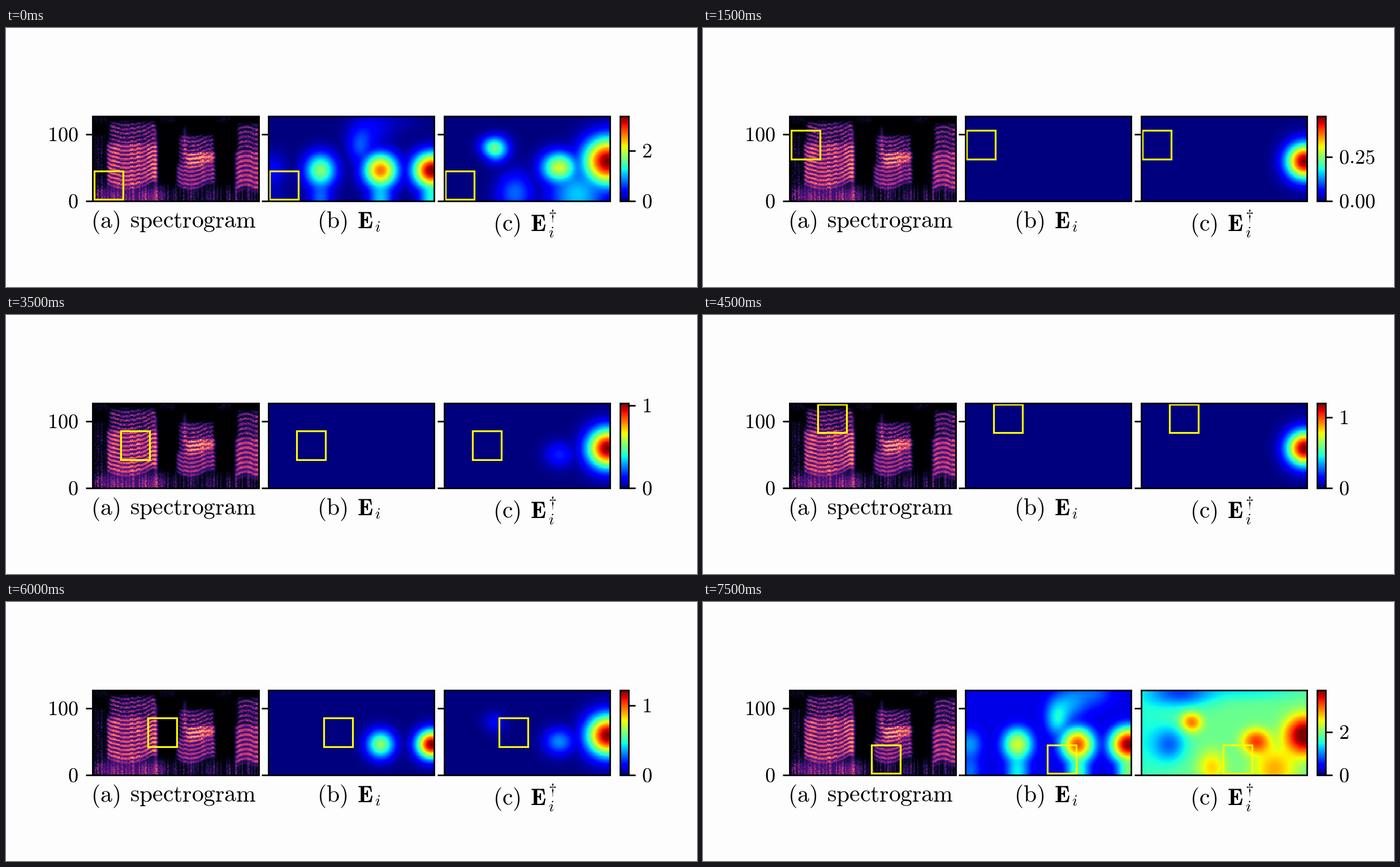
Animation of 1222x458 px, one loop 8 s. Source, as a matplotlib script:

```python
import numpy as np
import matplotlib.pyplot as plt
from matplotlib.animation import FuncAnimation
from matplotlib.patches import Rectangle

plt.rcParams.update({"mathtext.fontset": "cm", "text.hinting": "none"})

W, H, DPI = 1222, 458, 100
PT = 72 / DPI                       # points per pixel
LINE = 2.8 * PT
TOP, BOTTOM = 156.4, 306.0
PANEL_W = 293.3
LEFTS = (153.2, 463.9, 774.7)
BAR = (1086.2, 1100.5)
HUNDRED = 188.4

# Largest energy of each step; the square climbs five rows, then moves right
PEAKS = (3.36, 1.7, 0.47, 0.479, 0.4, 0.105, 0.42, 1.024, 0.75, 1.2,
         3.52, 1.9, 1.215, 0.85, 0.7, 3.93)
E_START = (0.10, 0.78, 0.0, -0.1)   # threshold of (b) at the foot of a column

# Panel grid, x from the panel's left edge, y in stage pixels
COLS, ROWS = 147, 128
X, Y = np.meshgrid((np.arange(COLS) + 0.5) * PANEL_W / COLS,
                   TOP + (np.arange(ROWS) + 0.5) * (BOTTOM - TOP) / ROWS)


def sig(z):
    return 1 / (1 + np.exp(-np.clip(z, -50, 50)))


def bell(cx, cy, rx, ry, scale=1):
    return np.exp(-0.5 * (((X - cx) / rx) ** 2 + ((Y - cy) / ry) ** 2)
                  / scale ** 2)


def lit(amp, theta):
    return max(amp - theta, 0) / max(1 - theta, 0.05)


def blend(spots, theta, base=0):
    """Soft maximum of the spots that rise above the threshold."""
    scale = max(1 - theta, 0.05) ** 0.25
    powers = lit(base, theta) ** 3 + sum(
        (lit(amp, theta) * bell(*place, scale)) ** 3 for *place, amp in spots)
    return np.cbrt(powers)


E_SPOTS = []
for x, amp in ((8, 0.2), (92, 0.56), (198, 0.81), (288, 1)):
    E_SPOTS.append((x, 252, 16 + 7 * amp, 22, amp))
    E_SPOTS.append((x, 300, 16, 30, 0.45 * amp ** 0.7))
for t in np.linspace(0, 1, 4):      # plume drifting up and to the right
    E_SPOTS.append((162 + 60 * t * t, 208 - 48 * t, 16 + 16 * t, 24,
                    0.28 - 0.14 * t))

D_SPOTS = [(88, 213, 19, 18, 0.70), (203, 247, 25, 22, 0.75),
           (288, 236, 33, 33, 1), (235, 295, 40, 40, 0.58),
           (125, 292, 26, 30, 0.52)]
D_HOLES = [(50, 252, 20, 21, 1), (68, 160, 42, 18, 1.2),
           (190, 156, 60, 12, 0.5), (0, 240, 40, 60, 0.4)]


def e_map(col, row):
    return np.clip(blend(E_SPOTS, E_START[col] + 0.3 * row), 0, 1)


def d_map(col, row):
    start = 0.38 - 0.19 * col
    theta = 0.85 - (0.85 - start) * 0.47 ** row
    v = blend(D_SPOTS, theta, 0.38)
    depth = min(0.75 + 1.3 * theta, 1)
    for *place, amp in D_HOLES:
        v = v * (1 - min(depth * amp, 1) * bell(*place))
    return np.clip(v, 0, 1)


def spectrogram():
    rng = np.random.default_rng(4)
    S = X + LEFTS[0]
    grain = rng.random((ROWS, COLS))
    column = rng.random(COLS)[None, :]
    block = np.repeat(rng.random(COLS // 3), 3)[None, :]

    def window(x0, x1, y0, y1):
        return (sig((S - x0) / 1.3) * sig((x1 - S) / 1.3)
                * sig((Y - y0) / 2) * sig((y1 - Y) / 2.5))

    def voice(x0, x1, top, split, foot, bend, gap, gain):
        wave = np.cos(2 * np.pi * (Y + bend + 2 * block) / gap)
        h = (0.5 + 0.5 * wave) * (0.75 + 0.4 * block)
        loud = window(x0, x1, split, foot - bend) * (0.22 + 0.5 * h)
        faint = window(x0 + 4, x1 - 3, top, split) * (0.1 + 0.42 * h)
        return gain * loud + faint * (0.5 + 0.6 * grain)

    def cup(x, width, depth):
        return np.minimum(depth * ((S - x) / width) ** 2, 1.3 * depth)

    v = voice(180, 267, 168, 205, 283, cup(214, 40, 10), 7.5, 1)
    v += voice(303, 369, 192, 243, 284, cup(326, 26, 8), 7.5, 0.75)
    v += voice(320, 369, 222, 222, 244, cup(326, 40, 8), 7.5, 1)
    v += voice(406, 450, 172, 219, 284, 3 * np.cos((S - 424) / 7), 8.5, 0.9)
    v += 0.2 * window(314, 318, 176, 245) + 0.3 * window(263, 266, 180, 304)

    # breath and low noise
    low = sig((Y - 284) / 5)
    v += low * (0.04 + 0.3 * column ** 2) * (0.5 + 0.7 * grain)
    v += 0.2 * low * window(170, 268, 150, 320)
    v += 0.18 * window(156, 181, 190, 302) * grain * column
    for x in (155, 272, 372):
        v += 0.14 * window(x, x + 27, 158, 166) * grain
    return np.clip(v * (0.86 + 0.28 * grain), 0, 0.84)


fig = plt.figure(figsize=(W / DPI, H / DPI), dpi=DPI, facecolor="#fdfdfd")
ax = fig.add_axes((0, 0, 1, 1))
ax.axis("off")


def image(data, x0, x1, cmap):
    return ax.imshow(data, extent=(x0, x1, BOTTOM, TOP), cmap=cmap, vmin=0,
                     vmax=1, interpolation="nearest", aspect="auto", zorder=1)


def box(x, y, w, h, color="black", lw=LINE, z=4):
    return ax.add_patch(Rectangle((x, y), w, h, fill=False, ec=color, lw=lw,
                                  joinstyle="miter", zorder=z))


def tick(x, y):
    return ax.plot([x, x + 12.2], [y, y], color="black", lw=LINE,
                   solid_capstyle="butt", zorder=4)[0]


def label(x, y, text, px=41.67, ha="left"):
    return ax.text(x, y, f"${text}$", fontsize=px * PT, ha=ha, va="baseline")


image(spectrogram(), LEFTS[0], LEFTS[0] + PANEL_W, "magma")
maps = [image(np.zeros((ROWS, COLS)), x, x + PANEL_W, "jet")
        for x in LEFTS[1:]]
image(np.linspace(1, 0, 256)[:, None], *BAR, "jet")

for x in LEFTS:
    box(x, TOP, PANEL_W, BOTTOM - TOP)
    tick(x - 12.2, HUNDRED)
    tick(x - 12.2, BOTTOM)
box(BAR[0], TOP, BAR[1] - BAR[0], BOTTOM - TOP)
tick(BAR[1], BOTTOM)

NUM = 36.4                          # size of the tick digits
HALF = 0.325 * NUM
SCRIPT = 27.8
label(128, HUNDRED + HALF, "100", NUM, "right")
label(128, BOTTOM + HALF, "0", NUM, "right")

label(150.5, 353.5, r"\mathrm{(a)}")
label(219, 353.5, r"\mathrm{spectrogram}")
label(550, 353.5, r"\mathrm{(b)}")
label(861.3, 359, r"\mathrm{(c)}")
for x, y, drop in ((620.7, 353.5, 6.3), (927, 359, 10.3)):
    label(x, y, r"\mathbf{E}")
    label(x + 31.6, y + drop, "i", SCRIPT)
label(958.8, 341.1, r"\dagger", SCRIPT)

squares = [box(0, 0, 51, 50.6, "#ffff00", 3.2 * PT, 3) for _ in LEFTS]
zero = label(1123.5, BOTTOM + HALF, "0", NUM)
upper = label(1123.5, 0, "0", NUM)
upper_tick = tick(BAR[1], 0)

ax.set_xlim(0, W)
ax.set_ylim(H, 0)


def update(n):
    col, row = divmod(n, 5)
    for x, square in zip(LEFTS, squares):
        square.set_xy((x + 2.4 + 47.6 * col, 252.5 - 23.75 * row))
    maps[0].set_data(e_map(col, row))
    maps[1].set_data(d_map(col, row))

    peak = PEAKS[n]
    step = max(s for s in (0.1, 0.25, 0.5, 1, 2) if s <= peak)
    text = f"{step:g}"
    y = BOTTOM - (BOTTOM - TOP) * step / peak
    upper_tick.set_ydata([y, y])
    upper.set_y(y + HALF)
    upper.set_text(f"${text}$")
    zero.set_text(f"${0:.{max(len(text) - 2, 0)}f}$")
    return [*squares, *maps, upper_tick, upper, zero]


anim = FuncAnimation(fig, update, frames=len(PEAKS), interval=500,
                     repeat=True, repeat_delay=0, blit=False)
plt.show()
```
